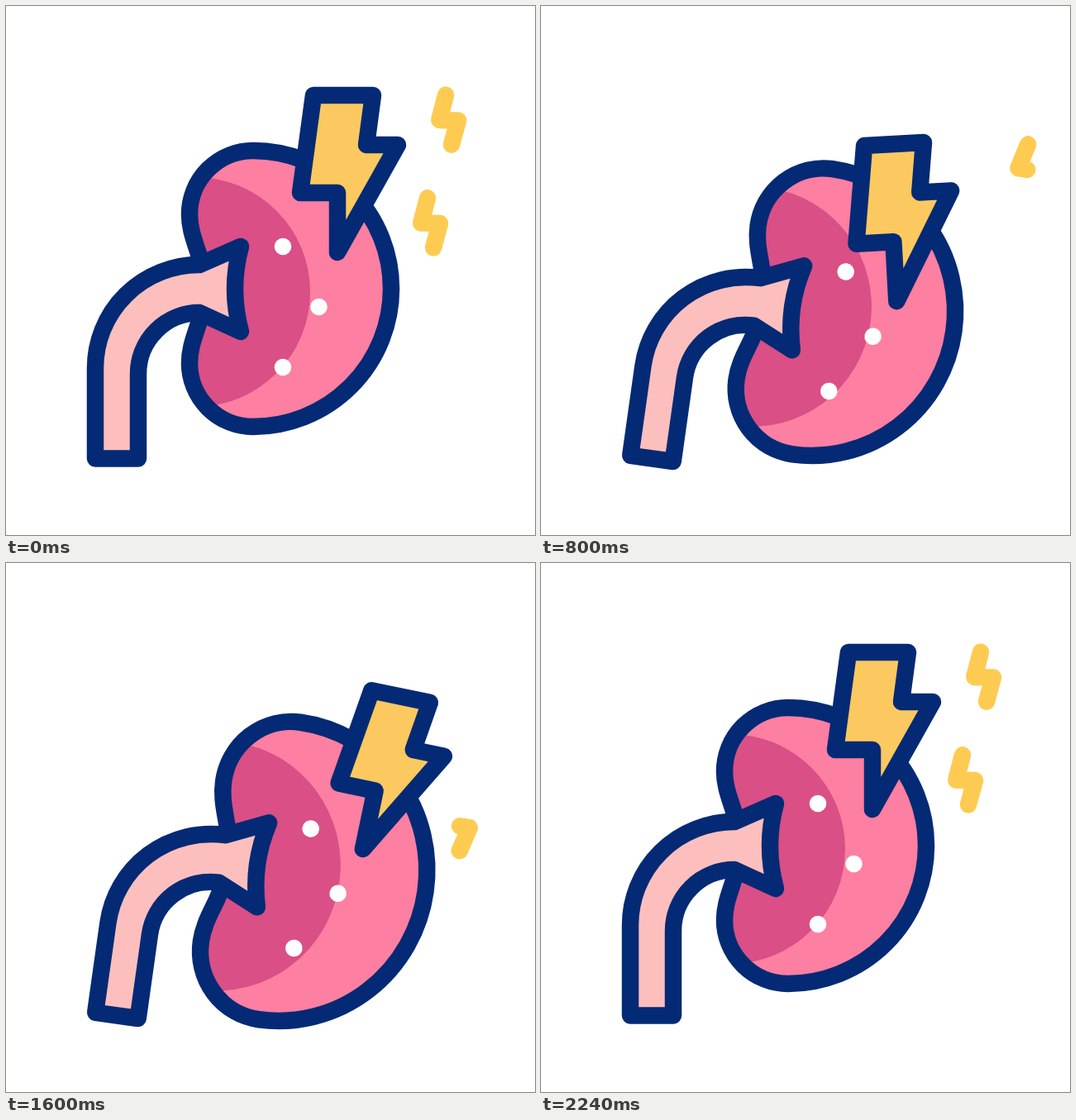
Write an HTML page with a canvas that moves like this. It is 640x640 px and loops after 2400 ms.

```html
<!DOCTYPE html>
<html lang="en">
<head>
<meta charset="utf-8">
<title>Kidney pain</title>
<style>
  html, body { margin: 0; width: 100%; height: 100%; overflow: hidden; background: #fff; }
  canvas { display: block; width: 100vw; height: 100vh; }
</style>
</head>
<body>
<canvas id="stage" width="640" height="640"></canvas>
<script>
const ctx = document.getElementById('stage').getContext('2d');
const LOOP = 2400, STEP = 20;
const NAVY = '#042a75', PINK = '#fd7fa1', MAGENTA = '#d94f86';
const PALE = '#fdbfbd', GOLD = '#fbc95f', YELLOW = '#fecb52';

const kidney = new Path2D(`M299 175 A167 167 0 0 1 299 509 A77 77 0 0 1 222 432
  C222 414 228 400 233 384 Q246 342 233 300 C228 284 222 270 222 252 A77 77 0 0 1 299 175 Z`);
const shade = new Path2D('M90 346 A139 139 0 0 1 368 346 A139 139 0 0 1 90 346 Z');
const tube = new Path2D(`M108 547.4 V438 A126 125 0 0 1 234 313 L284 291 Q270 342 284 394
  L234 371 A74 74 0 0 0 160 445 V547.4 Z`);
// The bolt is drawn from its tip, a spark from its top end.
const bolt = new Path2D('M-29 -190 H43 L35 -130 H73 L0 0 V-72 H-45 Z');
const spark = new Path2D('M0 0 L-7.8 30.2 L15 30.7 L7 60');
const SPARK_LENGTH = 84.4;

function ease(t, from, to) {
  const u = Math.min(1, Math.max(0, (t - from) / (to - from)));
  return u * u * (3 - 2 * u);
}

// Motion of each part as a sum of eased moves.
const sway = t => 8 * (ease(t, 200, 800) - ease(t, 1600, 2200));
const swell = t => ease(t, 400, 1200) - ease(t, 1600, 2000);
const strike = t => 26.5 * ease(t, 200, 680) - 50 * ease(t, 680, 1200)
  + 35.8 * ease(t, 1200, 1700) - 12.3 * ease(t, 1700, 2200);
const boltTilt = t => -3.1 * ease(t, 200, 800) + 14.9 * ease(t, 800, 1240)
  - 11.8 * ease(t, 1600, 2000);

function rotate(degrees) {
  ctx.rotate(degrees * Math.PI / 180);
}

function outline(path) {
  ctx.strokeStyle = NAVY;
  ctx.stroke(path);
}

function fill(path, color) {
  ctx.fillStyle = color;
  ctx.fill(path);
}

function scaled(path, matrix) {
  const result = new Path2D();
  result.addPath(path, matrix);
  return result;
}

// The shape grows while its outline keeps its weight.
function drawKidney(amount) {
  const matrix = new DOMMatrix()
    .translate(215, 287)
    .scale(1 + 0.068 * amount, 1 + 0.087 * amount)
    .translate(-215, -287);
  const body = scaled(kidney, matrix);
  fill(body, PINK);
  ctx.save();
  ctx.clip(body);
  fill(scaled(shade, matrix), MAGENTA);
  ctx.restore();
  outline(body);
}

function drawDots() {
  ctx.fillStyle = '#fff';
  for (let row = -1; row <= 1; row++) {
    ctx.beginPath();
    ctx.arc(378.5 - 43.5 * Math.abs(row), 364 + 73 * row, 10.3, 0, 2 * Math.PI);
    ctx.fill();
  }
}

// A spark is erased from its lower end, then drawn back from there.
function drawSpark(x, y, t, hideAt, showAt) {
  const shown = ease(t, showAt, showAt + 600);
  const amount = 1 - ease(t, hideAt, hideAt + 600) + shown;
  if (amount < 0.001) return;
  const visible = SPARK_LENGTH * amount;
  ctx.save();
  ctx.translate(x, y);
  if (amount < 1) {
    ctx.setLineDash([visible, 2 * SPARK_LENGTH]);
    ctx.lineDashOffset = shown ? visible - SPARK_LENGTH : 0;
  }
  ctx.strokeStyle = YELLOW;
  ctx.stroke(spark);
  ctx.restore();
}

function draw(t) {
  const angle = sway(t);
  ctx.fillStyle = '#fff';
  ctx.fillRect(0, 0, 640, 640);
  ctx.lineCap = ctx.lineJoin = 'round';
  ctx.lineWidth = 20.5;

  ctx.save();
  ctx.translate(134, 547);
  rotate(angle);
  ctx.translate(-134, -547);

  drawKidney(swell(t));
  drawDots();
  fill(tube, PALE);
  outline(tube);
  drawSpark(532, 107.7, t, 500, 1600);
  drawSpark(510, 232.3, t, 200, 1300);

  ctx.translate(401, 298 + strike(t));
  rotate(boltTilt(t) - angle);
  fill(bolt, GOLD);
  outline(bolt);
  ctx.restore();
}

function tick() {
  const t = performance.now() % LOOP;
  draw(Math.floor(t / STEP) * STEP);
  requestAnimationFrame(tick);
}
tick();
</script>
</body>
</html>
```
